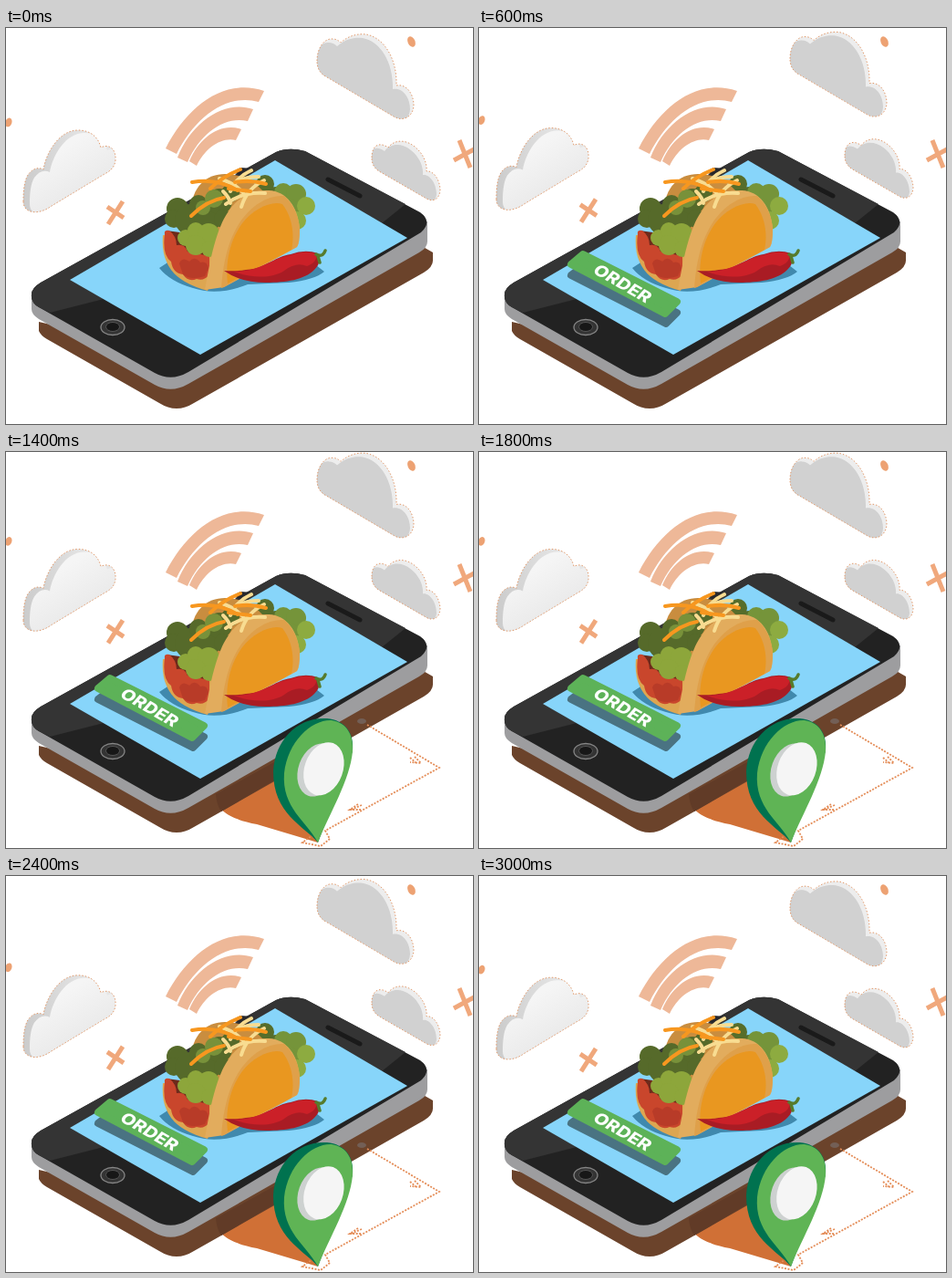
These frames come from a looping animation (512 px wide and 434 px high, 3200 ms). An HTML page:

```html
<!DOCTYPE html>
<html lang="en">
<head>
<meta charset="utf-8">
<title>Order by phone</title>
<style>
html, body { margin: 0; width: 100%; height: 100%; overflow: hidden; background: #fff; }
svg { display: block; width: 100vw; height: 100vh; }
.speckle { stroke: #e39a6b; stroke-width: 1; stroke-dasharray: 1.5 2; }
.dots { fill: none; stroke: #e48d58; stroke-width: 1.8; stroke-dasharray: 2 1.5; }
.cross { fill: none; stroke: #f0a87c; stroke-width: 5; }
.strand { fill: none; stroke-width: 4; stroke-linecap: round; }
</style>
</head>
<body>
<svg viewBox="0 0 512 434">
  <defs>
    <linearGradient id="pale" x1="0" y1="0" x2=".7" y2="1">
      <stop offset=".3" stop-color="#f5f5f5"/><stop offset="1" stop-color="#e4e4e4"/>
    </linearGradient>
    <linearGradient id="edge" x1="0" y1="0" x2="1" y2="0">
      <stop offset="0" stop-color="#cbcbcb"/><stop offset=".7" stop-color="#e6e6e6"/>
    </linearGradient>
    <path id="leftCloud" d="M19 190C19 178 20 168 24 161C29 154 35 152 41 155C44 137 58 112 79 112C92 112 101 119 104 131C114 126 121 134 120 145C119 153 114 157 108 160L50 195C35 206 19 203 19 190Z"/>
    <path id="topCloud" d="M341 36C341 22 349 11 358 12Q363 12 367 16C376 8 386 6 395 7C416 11 429 36 428 63C439 61 447 72 447 85C446 98 435 103 425 97L352 54C344 50 341 44 341 36Z"/>
    <path id="rightCloud" d="M401 142C401 129 409 124 419 131C426 122 438 122 448 130C457 137 462 148 461 157C469 156 476 167 476 178C475 188 468 191 461 187L409 157C403 153 401 148 401 142Z"/>
    <clipPath id="clipleftCloud"><use href="#leftCloud"/></clipPath>
    <clipPath id="cliptopCloud"><use href="#topCloud"/></clipPath>
    <clipPath id="cliprightCloud"><use href="#rightCloud"/></clipPath>
  </defs>

  <g fill="#eeb898">
    <path d="M175 132C198 87 238 54 283 69L277 81C242 71 207 98 187 138Z"/>
    <path d="M188 142C203 103 240 78 271 89L265 102C240 96 213 115 199 147Z"/>
    <path d="M201 146C212 120 235 103 258 111L252 123C236 119 218 132 209 151Z"/>
  </g>
  <path class="cross" d="M497 123L509 153M491 145L513 133"/>
  <ellipse cx="444.5" cy="15" rx="4" ry="6" fill="#eda273" transform="rotate(-25 444.5 15)"/>
  <g id="floating">
    <g id="clouds"></g>
    <path class="cross" d="M112 215L128 190M111 196L129 208"/>
    <ellipse cx="3" cy="103.500" rx="3.500" ry="5" fill="#eda273" transform="rotate(20 3 103)"/>
  </g>

  <path class="delivery" fill="#d07036" d="M230 376C230 395 250 403 275 408L342 428L322 340L280 345Z"/>
  <path fill="#6b432b" d="M36 322V332Q38 337 45 341L168 411Q187 423 206 411L458 268Q468 262 468 255V246L440 230L200 360Z"/>
  <path class="delivery" fill="#613b27" d="M230 375Q231 387 236 394L294 360V340Z"/>

  <path fill="#9d9d9f" d="M28 290V308Q28 314 36 319L163 391Q181 401 200 390L453 246Q462 241 462 234V212Z"/>
  <path fill="#222" d="M28 292Q28 285 38 279L296 136Q310 130 328 135L454 202Q468 212 455 224L200 377Q181 388 163 378L36 306Q27 301 28 292Z"/>
  <path fill="#343434" d="M28 292Q28 285 38 279L296 136Q310 130 328 135L438 193L412 214L295 145L70 276L107 297L48 312L36 306Q27 301 28 292Z"/>
  <path fill="#87d5fa" d="M295 145L440 230L213 358L70 276Z"/>
  <path d="M353 166L388 184" stroke="#1a1a1a" stroke-width="5" stroke-linecap="round"/>
  <ellipse cx="117" cy="328" rx="13" ry="8.500" fill="#343434" stroke="#858585" stroke-width="1.300"/>
  <ellipse cx="117" cy="327.500" rx="7.500" ry="5" fill="#171717" stroke="#555"/>

  <g id="taco">
    <path fill="#4089ad" d="M168 263L185 252L340 260L349 267Q338 276 310 279L265 281Q232 294 205 285Q180 278 168 263Z"/>
    <g id="backLettuce"></g>
    <path fill="#c98d3f" d="M203 201C203 174 220 160 240 160Q265 160 283 180L235 235Z"/>
    <path fill="#dda651" d="M172 227Q170 250 181 265Q192 280 221 288L246 225Z"/>
    <path fill="#6d2a1b" d="M176 222L205 226L221 253L180 245Z"/>
    <path fill="#c9462c" d="M174 226Q173 221 179 222Q187 228 187 238Q196 236 199 245L223 250V270Q217 278 209 275Q200 279 194 270Q183 269 181 256Q171 249 174 226Z"/>
    <path fill="#b83b28" d="M190 258Q193 250 201 256Q207 249 213 257Q220 255 222 263L218 272Q202 277 194 270Z"/>
    <g id="frontLettuce"></g>
    <path fill="#e2ac5d" d="M218 287C222 265 227 235 237 213C249 188 266 177 288 178C308 179 320 196 322 220Q322 236 319 240L239 284Z"/>
    <path fill="#dfa04a" d="M236 285C238 258 243 233 257 212C269 195 286 183 305 184Q320 198 322 220Q322 236 319 240L239 284Z"/>
    <path fill="#e99720" d="M243 280C240 255 246 232 259 214C271 199 290 189 303 193C313 206 317 225 313 243Z"/>
    <path fill="#27272b" d="M248 158L257 153L271 154L263 163Z"/>
    <g class="strand" stroke="#f8dc91">
      <path d="M234 165Q253 171 262 183"/><path d="M283 167Q264 176 258 196"/>
      <path d="M269 156Q252 164 246 179"/><path d="M284 181Q259 179 241 193"/>
      <path d="M238 179Q245 186 246 192"/><path d="M277 163Q264 163 253 168"/>
    </g>
    <g class="strand" stroke="#f7971f">
      <path d="M204 169Q231 164 254 178"/><path d="M203 206Q220 189 239 186"/>
      <path d="M224 176Q237 163 257 155"/><path d="M251 169Q269 166 285 171"/>
      <path d="M244 176L268 179"/>
    </g>
    <path fill="#a91c24" d="M239 266Q251 267 263 265C285 264 295 250 312 248Q328 242 342 247Q347 256 338 265C327 276 307 279 285 279Q257 279 239 266Z"/>
    <path fill="#cb2028" d="M250 267C280 267 291 252 312 249Q329 243 341 248Q341 257 330 261Q318 256 305 266C290 276 266 273 250 267Z"/>
    <path fill="none" stroke="#567b2c" stroke-width="3.500" stroke-linecap="round" d="M340 248Q347 252 350 244M342 250L344 257"/>
  </g>

  <g id="order">
    <path fill="#4a7382" stroke="#4a7382" stroke-width="8" stroke-linejoin="round" d="M101 271L114 261L217 312L205 324Z"/>
    <g id="button">
      <path fill="#5db258" stroke="#5db258" stroke-width="8" stroke-linejoin="round" d="M101 259L114 248L217 300L204 313Z"/>
      <text transform="matrix(.866 .5 -.6 .68 157.5 280)" y="7" text-anchor="middle" font-family="Inter, 'Open Sans', sans-serif" font-weight="800" font-size="20" fill="#fff">ORDER</text>
    </g>
  </g>

  <g class="delivery">
    <ellipse cx="390" cy="295" rx="5" ry="3" fill="#735f56"/>
    <path class="dots" d="M396 299L475 346L350 415L355 424L345 432L325 428L336 420"/>
    <path class="dots" d="M443 335L450 341M448 334L455 341L443 340M390 387L378 392M386 386L377 392L389 392"/>
    <path fill="#00724f" d="M293 350C295 315 320 290 352 292C372 294 382 308 380 328L342 428C326 409 293 397 293 350Z"/>
    <path fill="#5fb455" d="M305 352C309 317 335 293 357 294C374 297 381 310 380 328C377 360 355 395 342 428C330 405 302 390 305 352Z"/>
    <g transform="rotate(20 346 348)">
      <ellipse cx="342" cy="350" rx="21" ry="30" fill="#cdd1d0"/>
      <ellipse cx="348" cy="346.500" rx="21" ry="30" fill="#f5f5f5"/>
    </g>
  </g>
</svg>
<script>
const LOOP = 3200, STEP = 200, RISE = 6.4;
const ORDER_IN = 400, PRESS = 1000, RELEASE = 1200;
const byId = id => document.getElementById(id);

function cloud(id, side, front, dx, dy) {
  return `<use href="#${id}" fill="${side}"/>
    <g clip-path="url(#clip${id})"><use href="#${id}" fill="${front}" x="${dx}" y="${dy}"/></g>
    <use href="#${id}" fill="none" class="speckle"/>`;
}

const leaves = (color, spots) => spots
  .map(([x, y, r]) => `<circle cx="${x}" cy="${y}" r="${r}" fill="${color}"/>`).join('');

byId('clouds').innerHTML =
  cloud('leftCloud', 'url(#edge)', 'url(#pale)', 7, 3) +
  cloud('topCloud', '#ededed', '#d1d1d1', -4, 4) +
  cloud('rightCloud', '#ededed', '#d1d1d1', -4, 4);

byId('backLettuce').innerHTML =
  leaves('#566d2b', [[284, 171, 10], [296, 185, 11]]) +
  leaves('#75943a', [[304, 180, 10], [318, 182, 11], [310, 199, 12]]) +
  leaves('#8dab40', [[329, 195, 10], [319, 211, 10]]);

byId('frontLettuce').innerHTML =
  leaves('#566a2a', [[188, 198, 12], [184, 209, 10], [202, 210, 17], [222, 206, 16],
    [234, 190, 14], [211, 193, 10], [246, 181, 10], [238, 209, 10]]) +
  leaves('#78913a', [[228, 187, 10], [216, 197, 8]]) +
  leaves('#8da63b', [[197, 230, 9], [208, 222, 9], [222, 226, 12], [208, 238, 11], [223, 242, 9]]);

const deliveryParts = document.querySelectorAll('.delivery');

function draw(time) {
  const t = Math.floor((time % LOOP) / STEP) * STEP;
  const lift = RISE * (1 - Math.abs(2 * t / LOOP - 1));
  const pressed = t >= PRESS && t < RELEASE;
  byId('floating').setAttribute('transform', `translate(0 ${-lift})`);
  byId('order').style.display = t >= ORDER_IN ? '' : 'none';
  byId('button').setAttribute('transform', `translate(0 ${pressed ? 5.5 : 0})`);
  for (const part of deliveryParts) part.style.display = t >= RELEASE ? '' : 'none';
}

const start = performance.now();
function tick() {
  draw(performance.now() - start);
  requestAnimationFrame(tick);
}
tick();
</script>
</body>
</html>
```
